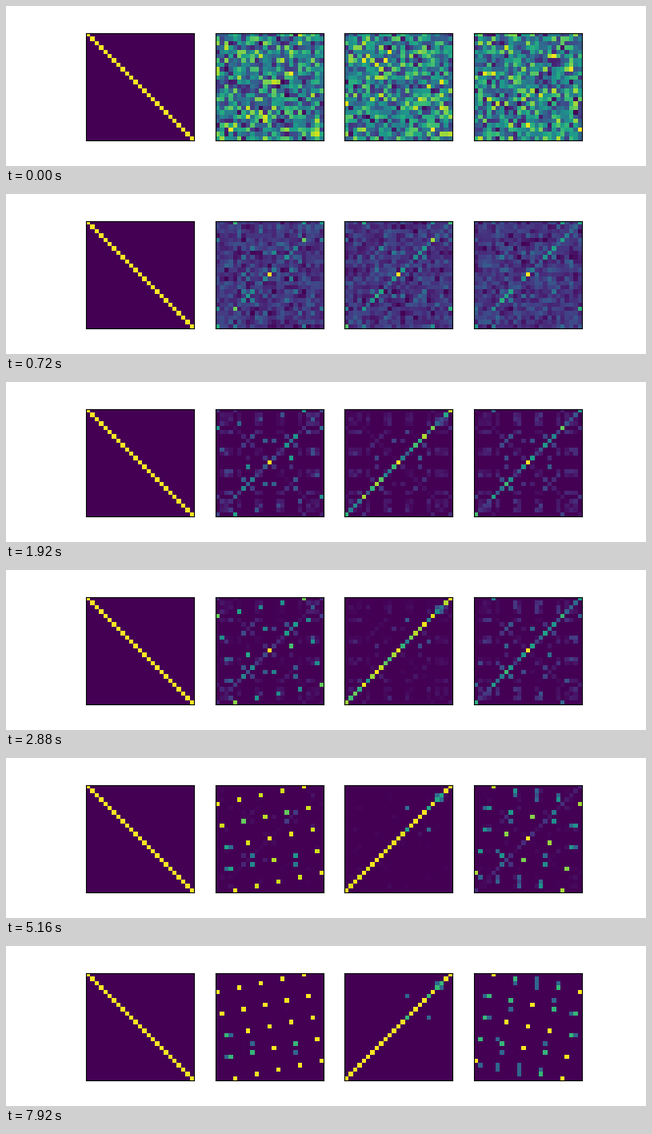
Recreate the animation shown at these times as a matplotlib script. Size 800 by 200 pixels, loop 8000 ms.

```python
import numpy as np
import matplotlib.pyplot as plt
from matplotlib.animation import FuncAnimation

SIDE = 5
N = SIDE * SIDE
STEP = 120            # ms between changes of the picture
TICK = 40             # ms per drawn frame
LOOP = 8000
BEGIN, END = 1200, 7920   # noise gone, last change

node = np.arange(N)
row, col = node // SIDE, node % SIDE
dr, dc = abs(row - 2), abs(col - 2)

# Node classes of the 5x5 grid under its symmetries
CORNER, EDGE, DIAG, CROSS, CENTRE = range(5)
ring = np.maximum(dr, dc)
kind = np.select([dr + dc == 4, ring == 2, dr + dc == 2, ring == 1],
                 [CORNER, EDGE, DIAG, CROSS], CENTRE)
ORBIT = (kind[:, None] == kind).astype(float)
ORBIT[node, node] *= np.where(kind == CENTRE, 1, 0.4)
ANTI = np.eye(N)[::-1]


class Rotation:
    """Matrix that drifts from noise over orbit averages to a rotation."""

    def __init__(self, target, mids, tilt, swaps, seed):
        rng = np.random.default_rng(seed)
        self.target = np.eye(N)[target]
        self.mid = np.array(mids + [0])[kind][:, None]
        self.tilt = tilt
        self.rough = rng.normal(0, 1, (N, N))
        self.start = rng.beta(2, 2.8, (N, N))
        self.later = np.clip(rng.normal(.28, .13, (N, N)), 0, 1)
        # first traces of structure: corners and the middle row
        spark = rng.random((N, N)) ** 2
        trace = ORBIT * (kind == CORNER) * (1 - np.eye(N))
        trace[12, 6:17:2] = .5
        self.later = np.clip(self.later + .9 * trace * spark, 0, 1)
        # neighbouring rows that stay partly swapped
        self.rival = np.zeros((N, N))
        for a, b in swaps:
            shift = self.target[b] - self.target[a]
            self.rival[a] += shift
            self.rival[b] -= shift

    def settled(self, t):
        u = np.clip((t - BEGIN) / (END - BEGIN), 0, 1)
        lean = self.tilt * (.4 + .6 * min(4 * u, 1))
        spread = ORBIT * np.exp(lean * ANTI + 1.6 * u ** .5 * self.rough)
        spread /= spread.sum(axis=1, keepdims=True)
        final = np.clip(self.target + (.45 - .12 * u) * self.rival, 0, 1)
        p = 1 / (1 + np.exp((self.mid - t) / 850)) * min(8 * u, 1)
        return (1 - p) * spread + p * final

    def at(self, t):
        mix = min(t / 360, 1)
        fade = np.interp(t, [360, 700, 1100], [1, .35, 0])
        grow = np.interp(t, [360, 700, 1100], [0, .6, 1])
        noise = (1 - mix) * self.start + mix * self.later
        return fade * noise + grow * self.settled(t)


# Midpoints in ms: corner, edge, diagonal, cross
rotations = [
    Rotation((4 - col) * SIDE + row, [2000, 3000, 4200, 3500], 1,
             [(14, 19), (16, 18)], 3),
    Rotation(N - 1 - node, [2000, 2800, 2800, 2700], 2,
             [(2, 3), (5, 10)], 4),
    Rotation(col * SIDE + 4 - row, [3600, 3900, 4200, 4000], 2,
             [(1, 2), (2, 3), (5, 10), (9, 14), (6, 8), (16, 18),
              (15, 21), (21, 22), (22, 23)], 5),
]

fig, axes = plt.subplots(1, 4, figsize=(8, 2), dpi=100)
for ax in axes:
    ax.set_xticks([])
    ax.set_yticks([])
axes[0].imshow(np.eye(N))
images = [ax.imshow(rot.at(0)) for ax, rot in zip(axes[1:], rotations)]


def draw(i):
    t = i * TICK // STEP * STEP
    for im, rot in zip(images, rotations):
        im.set_data(rot.at(t))
        im.autoscale()
    return images


anim = FuncAnimation(fig, draw, frames=LOOP // TICK, interval=TICK,
                     repeat=True, repeat_delay=0)
plt.show()
```
